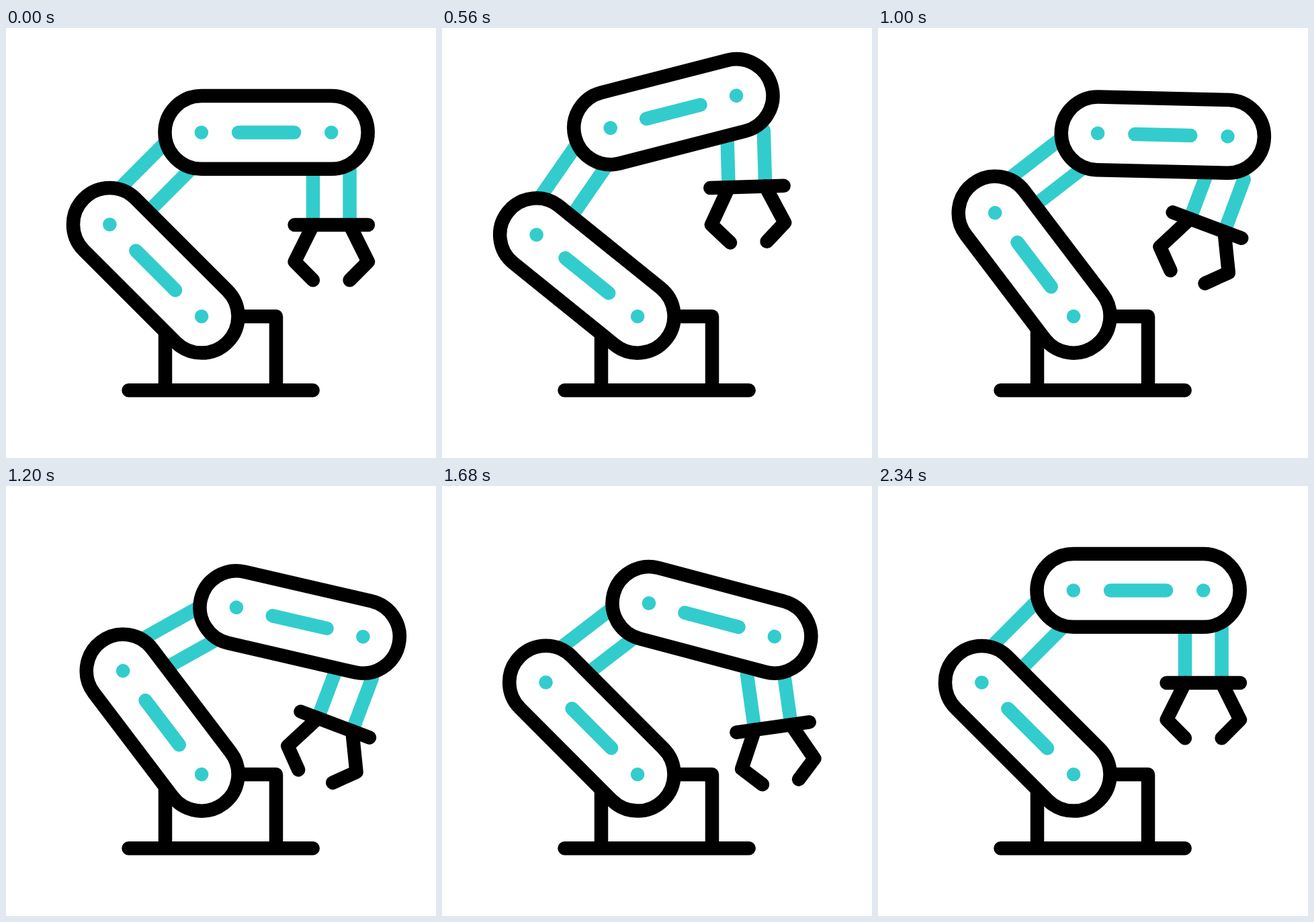
Animation, 640 px wide and 640 px high, one loop 2400 ms. Source, as an HTML page:

```html
<!DOCTYPE html>
<html lang="en">
<head>
<meta charset="utf-8">
<title>Robot arm</title>
<style>
  html, body { margin: 0; width: 100%; height: 100%; overflow: hidden; background: #fff; }
  svg { display: block; width: 100%; height: 100%; }
  .dark, .teal { fill: none; stroke-width: 20.5; stroke-linecap: round; stroke-linejoin: round; }
  .dark { stroke: #000; }
  .teal { stroke: #3cc; }
  .body { fill: #fff; }
  .dot { fill: #3cc; }
</style>
</head>
<body>
<svg viewBox="0 0 640 640">
  <defs>
    <!-- pivot at the origin, far end at x = 193.4 -->
    <g id="segment">
      <rect class="dark body" x="-54.4" y="-54.4" width="302.2" height="108.8" rx="54.4"/>
      <circle class="dot" r="10.3"/>
      <circle class="dot" cx="193.4" r="10.3"/>
      <path class="teal" d="M55.2 0H138.2"/>
    </g>
    <path id="finger" class="dark" d="M0 0L-27.3 54.8L0 82.2"/>
  </defs>
  <path class="dark" d="M182.5 539.3H456.7M237 539.3V440M300 429.2H402V539.3"/>
  <path id="link" class="teal" d="M0 -27.3H193.4M0 27.3H193.4"/>
  <use id="arm" href="#segment"/>
  <g id="grip">
    <path class="teal" d="M-27.3 0V83.3M27.3 0V83.3"/>
    <use id="left" href="#finger"/>
    <use id="right" href="#finger"/>
    <path class="dark" d="M-54.7 83.3H54.7"/>
  </g>
  <use id="boom" href="#segment"/>
</svg>
<script>
const LOOP = 2400, REACH = 193.4;
const el = id => document.getElementById(id);
const parts = {};
for (const id of ['link', 'arm', 'grip', 'left', 'right', 'boom']) parts[id] = el(id);

// Each move: start ms, end ms, value reached in degrees
const moves = {
  arm:  [[0, 380, -6.1], [575, 945, 7.8], [1330, 1705, 0]],
  link: [[322, 690, -5.7], [848, 1212, 8.1], [1620, 1985, 0]],
  boom: [[325, 695, -6], [1085, 1450, 7.3], [1812, 2208, 0]],
  grip: [[335, 705, 19.2], [1075, 1440, -22.9], [1812, 2208, 0]],
  claw: [[580, 760, 17.3], [760, 940, 0]]
};

function valueAt(list, t) {
  let v = 0;
  for (const [start, end, to] of list) {
    const u = Math.min(1, Math.max(0, (t - start) / (end - start)));
    v += (to - v) * u * u * (3 - 2 * u);
  }
  return v;
}

function along([x, y], deg, dist) {
  const a = deg * Math.PI / 180;
  return [x + dist * Math.cos(a), y + dist * Math.sin(a)];
}

function place(id, [x, y], deg, extra = '') {
  parts[id].setAttribute('transform',
    `translate(${x.toFixed(3)} ${y.toFixed(3)}) rotate(${deg.toFixed(3)})${extra}`);
}

function draw(t) {
  const at = name => valueAt(moves[name], t);
  const arm = at('arm');
  const link = arm + at('link');
  const boom = link + at('boom');
  const grip = boom + at('grip');
  const claw = at('claw');

  const base = [291.1, 429.2];
  const elbow = along(base, 225 + arm, REACH);
  const shoulder = along(elbow, link - 45.1, REACH);
  const head = along(shoulder, boom, REACH);
  const wrist = along(head, boom + 90, 54.2);

  place('arm', base, 225 + arm);
  place('link', elbow, link - 45.1);
  place('boom', shoulder, boom);
  place('grip', wrist, grip);
  place('left', [-27.3, 83.3], -claw);
  place('right', [27.3, 83.3], claw, ' scale(-1 1)');
}

const begin = performance.now();
function tick() {
  draw((performance.now() - begin) % LOOP);
  requestAnimationFrame(tick);
}
draw(0);
requestAnimationFrame(tick);
</script>
</body>
</html>
```
